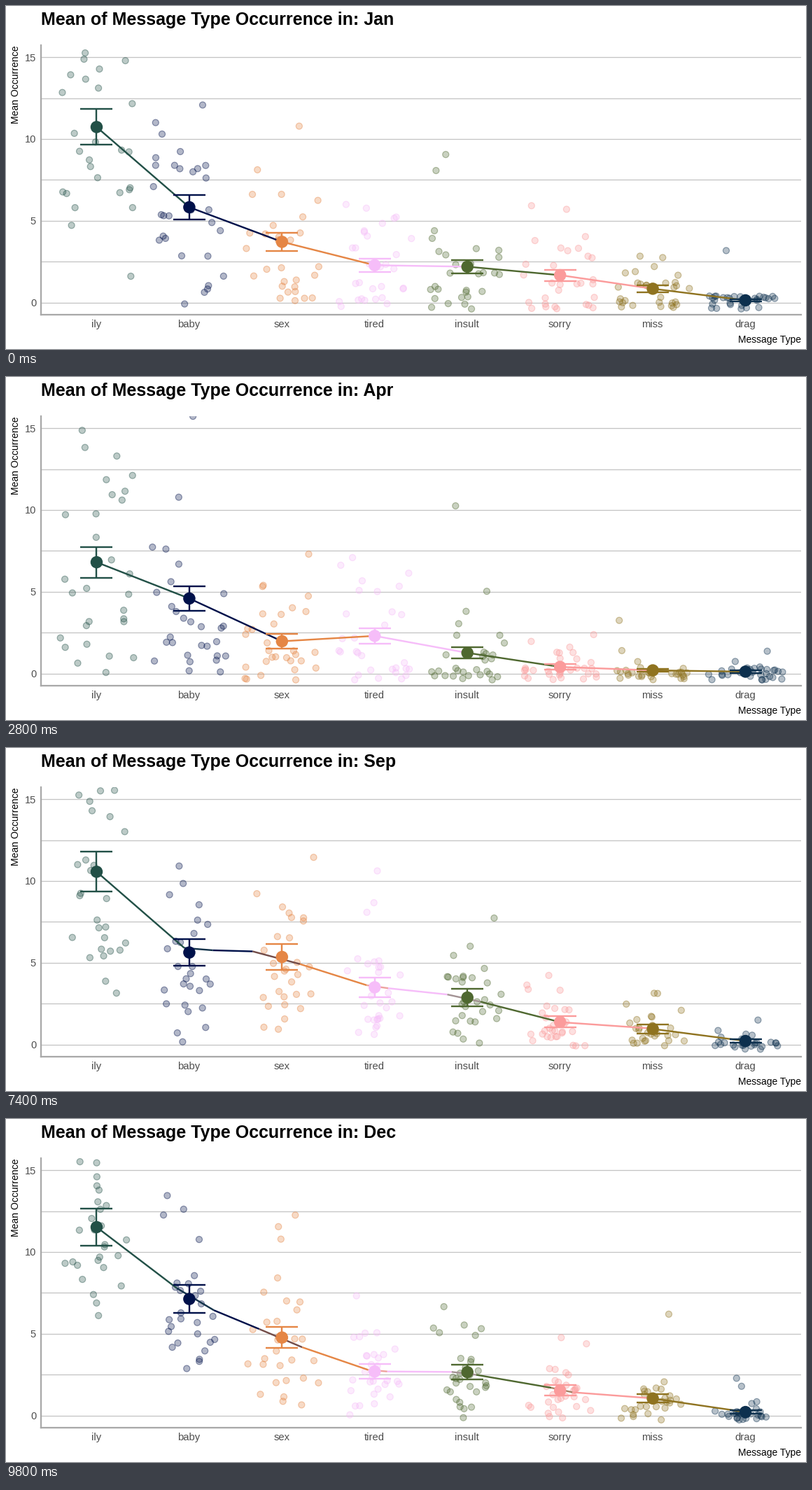
These frames come from a looping animation (1143x490 px, 10 s). A matplotlib script:

```python
import numpy as np
import matplotlib.pyplot as plt
from matplotlib.animation import FuncAnimation
from matplotlib.collections import LineCollection
from matplotlib.colors import to_rgb

W, H, DPI = 1143, 490, 100
PX = 72 / DPI                       # points per pixel
LEFT, RIGHT, TOP, BOTTOM = 50, 1136, 56, 441
STEP = (RIGHT - LEFT) / 8.2         # pixels between two types
DAYS = 30

MONTHS = "Jan Feb Mar Apr May Jun Jul Aug Sep Oct Nov Dec".split()
STARTS = [0, 4, 9, *range(14, 51, 4)]
TYPES = "ily baby sex tired insult sorry miss drag".split()
COLORS = np.array([to_rgb(c) for c in (
    "#225047", "#00114a", "#e58645", "#f6bdf9",
    "#4f6830", "#fb9b9b", "#8f7320", "#0d304e")])
X = np.arange(1, 9)

# Key months; those left out lie halfway between their neighbours.
KEY_MEANS = {
    "Jan": (10.74, 5.83, 3.71, 2.28, 2.19, 1.67, .84, .13),
    "Mar": (8.72, 6.30, 2.75, 1.48, 1.27, .88, .92, .17),
    "Apr": (6.81, 4.59, 1.97, 2.30, 1.26, .40, .19, .11),
    "Jun": (7.48, 5.20, 3.03, 1.86, 1.44, .80, .50, .18),
    "Aug": (11.48, 5.87, 3.19, 2.51, 1.20, .70, 1.26, .25),
    "Oct": (10.27, 5.55, 6.08, 3.83, 3.43, 1.60, .85, .20),
    "Dec": (12.32, 8.43, 5.83, 3.10, 3.11, 1.39, 1.24, .29),
}


def monthly_means():
    known = [i for i, m in enumerate(MONTHS) if m in KEY_MEANS]
    keys = np.array([KEY_MEANS[MONTHS[i]] for i in known])
    return np.column_stack([np.interp(range(12), known, column)
                            for column in keys.T])


def standard_errors(means):
    """Spread grows with the mean and is widest in summer."""
    summer = 1 + .2 * np.sin(np.pi * np.arange(12) / 11)
    return .25 * means ** .62 * summer[:, None]


def daily_dots(means, errors, rng):
    """Skewed whole counts around each mean, jittered both ways."""
    sd = errors * DAYS ** .5
    shape, scale = (means / sd) ** 2, sd ** 2 / means
    counts = rng.gamma(shape[:, None], scale[:, None], (8, DAYS))
    counts *= (means / counts.mean(axis=1))[:, None]
    places = np.stack([np.repeat(X[:, None], DAYS, axis=1),
                       np.round(counts)], axis=2)
    return (places + rng.uniform(-.4, .4, places.shape)).reshape(-1, 2)


def mix(a, b, t):
    return a + (b - a) * t


def arc_length(y):
    s = np.append(0, np.cumsum(np.hypot(1, np.diff(y))))
    return s / s[-1]


def mixed_line(ya, yb, t):
    """Blend two lines point by point along their relative length."""
    sa, sb = arc_length(ya), arc_length(yb)
    s = np.unique(np.round(np.append(sa, sb), 9))
    x = mix(np.interp(s, sa, X), np.interp(s, sb, X), t)
    y = mix(np.interp(s, sa, ya), np.interp(s, sb, yb), t)
    points = np.column_stack([x, y])
    middle = (s[1:] + s[:-1]) / 2
    ca = COLORS[np.searchsorted(sa, middle) - 1]
    cb = COLORS[np.searchsorted(sb, middle) - 1]
    return np.stack([points[:-1], points[1:]], axis=1), mix(ca, cb, t)


def error_bars(y, e):
    cap = 23 / STEP

    def strokes(x0, y0, x1, y1):
        return np.stack([np.column_stack([x0, y0]),
                         np.column_stack([x1, y1])], axis=1)

    return np.concatenate([strokes(X, y - e, X, y + e),
                           strokes(X - cap, y - e, X + cap, y - e),
                           strokes(X - cap, y + e, X + cap, y + e)])


def state(frame):
    """Month shown, month to come, and progress between them."""
    i = max(k for k in range(12) if STARTS[k] <= frame)
    hold_end = STARTS[i] + (1 if i == 0 else 2)
    t = max(0, (frame - hold_end) / (STARTS[i + 1] - hold_end))
    return i, (i + 1) % 12, t


rng = np.random.default_rng(12)
means = monthly_means()
errors = standard_errors(means)
dots = [daily_dots(m, e, rng) for m, e in zip(means, errors)]

plt.rcParams["font.family"] = "Liberation Sans"
fig = plt.figure(figsize=(W / DPI, H / DPI), dpi=DPI, facecolor="white")
ax = fig.add_axes([LEFT / W, 1 - BOTTOM / H,
                   (RIGHT - LEFT) / W, (BOTTOM - TOP) / H])
ax.set(xlim=(.4, 8.6), ylim=(-.75, 15.75), xticks=[], yticks=[])
for side, spine in ax.spines.items():
    spine.set(visible=side in ("left", "bottom"),
              color="#a9a9a9", linewidth=2.3 * PX)


def label(x, y, text, size, **style):
    return fig.text(x / W, 1 - y / H, text, fontsize=size * PX,
                    va="baseline", **style)


for level in np.arange(0, 15.1, 2.5):
    ax.axhline(level, color="#c4c4c4", lw=1.3 * PX, zorder=0)
for value in (0, 5, 10, 15):
    label(43, 428.7 - value * 70 / 3, str(value), 14.5, ha="right",
          color="#4d4d4d")
for k, name in enumerate(TYPES):
    label(129 + STEP * k, 459, name, 14.7, ha="center", color="#4d4d4d")
label(RIGHT, 480.5, "Message Type", 13.9, ha="right")
label(18, TOP, "Mean Occurrence", 14, ha="right", rotation=90,
      rotation_mode="anchor")
title = label(LEFT, 27.5, "", 25, weight="bold")

rgb = np.repeat(COLORS, DAYS, axis=0)
scatter = ax.scatter(
    *dots[0].T, s=(9 * PX) ** 2, lw=1.2 * PX, zorder=1,
    facecolors=[(*c, .3) for c in rgb], edgecolors=[(*c, .42) for c in rgb])
line = ax.add_collection(
    LineCollection([], linewidths=2.4 * PX, zorder=2), autolim=False)
bars = ax.add_collection(
    LineCollection([], linewidths=2.4 * PX, zorder=3,
                   colors=np.tile(COLORS, (3, 1))), autolim=False)
heads = ax.scatter(X, X, s=(17.5 * PX) ** 2, c=COLORS, lw=0, zorder=4)


def update(frame):
    i, j, t = state(frame)
    title.set_text("Mean of Message Type Occurrence in: "
                   + MONTHS[i if t <= .5 else j])
    y = mix(means[i], means[j], t)
    scatter.set_offsets(mix(dots[i], dots[j], t))
    segments, colors = mixed_line(means[i], means[j], t)
    line.set_segments(segments)
    line.set_color(colors)
    bars.set_segments(error_bars(y, mix(errors[i], errors[j], t)))
    heads.set_offsets(np.column_stack([X, y]))
    return title, scatter, line, bars, heads


animation = FuncAnimation(fig, update, frames=50, interval=200,
                          repeat=True, repeat_delay=0, blit=False)
plt.show()
```
